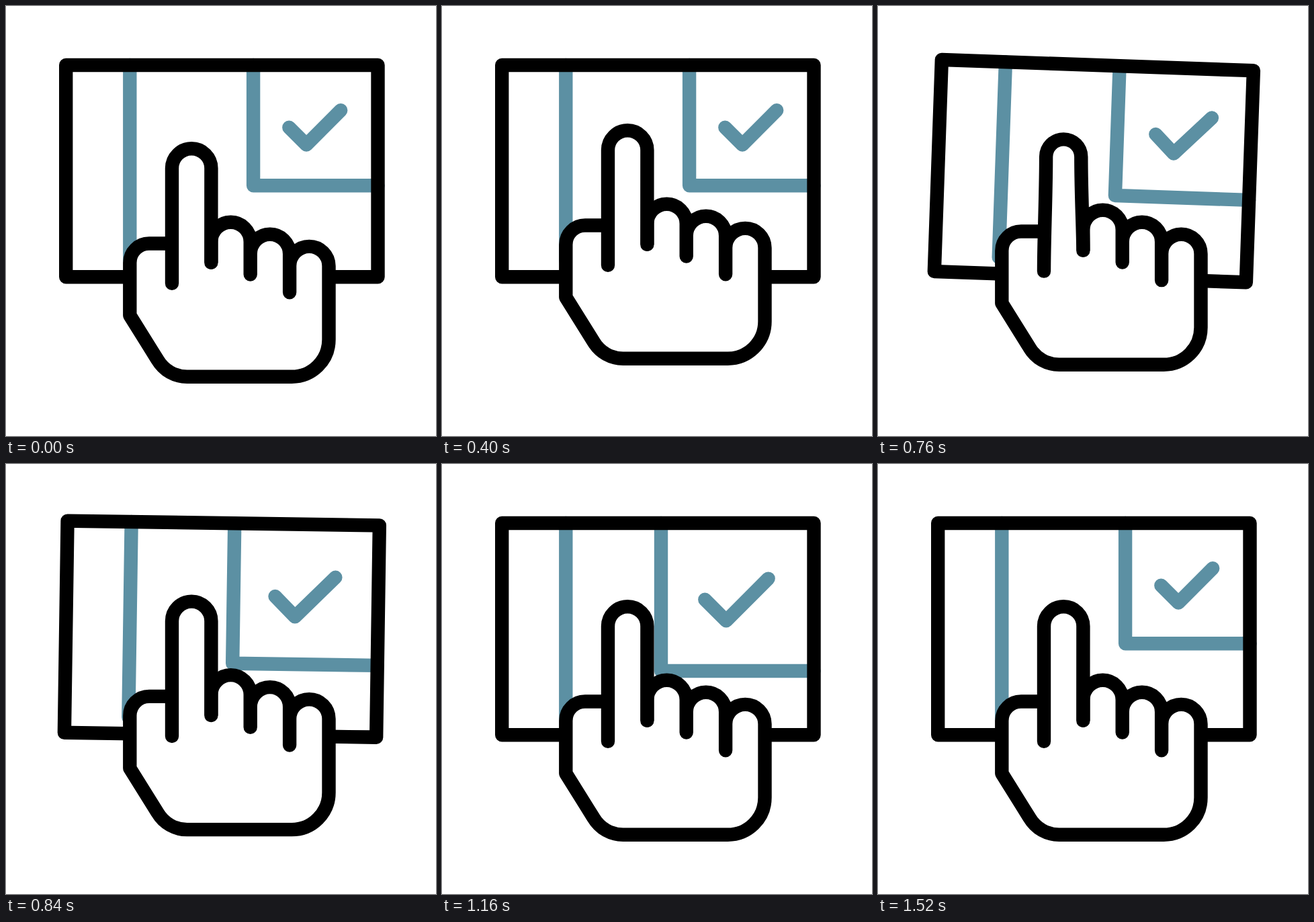
An HTML page for the animation above (1760 ms loop, 640 px wide and 640 px high).

```html
<!DOCTYPE html>
<html lang="en">
<head>
<meta charset="utf-8">
<title>Touch to confirm</title>
<style>
  html, body { margin: 0; width: 100%; height: 100%; overflow: hidden; background: #fff; }
  svg { display: block; width: 100%; height: 100%; }
  path, rect { stroke-width: 20.4; stroke-linecap: round; stroke-linejoin: round; }
  .accent { fill: none; stroke: #5c90a3; }
  .ink { stroke: #000; }
</style>
</head>
<body>
<svg viewBox="0 0 640 640">
  <g id="box">
    <path class="accent" d="M184.3 88V379"/>
    <path class="accent" id="label"/>
    <rect class="ink" fill="none" x="89.2" y="88" width="464.3" height="315.3"/>
  </g>
  <g id="hand" class="ink" fill="#fff">
    <path d="M247 353.5H213A28.7 28.7 0 0 0 184.3 382.2V460.5L225.5 526.5C235 542.5 251.5 551.8 269.5 551.8H425.3A55.2 55.2 0 0 0 480.5 496.6V387A29.2 29.2 0 0 0 422.1 387V426.2V369A29.2 29.2 0 0 0 363.7 369V399.5V351A29.2 29.2 0 0 0 305.3 351V381.7"/>
    <path id="finger"/>
  </g>
</svg>
<script>
const LOOP = 1760, STEP = 40;
const box = document.getElementById('box');
const label = document.getElementById('label');
const hand = document.getElementById('hand');
const finger = document.getElementById('finger');

// Cubic Bezier easing with y1 = 0 and y2 = 1, solved by bisection.
const ease = (x1, x2) => x => {
  if (x <= 0) return 0;
  if (x >= 1) return 1;
  let lo = 0, hi = 1, s;
  for (let i = 0; i < 24; i++) {
    s = (lo + hi) / 2;
    const r = 1 - s;
    if (3 * s * r * r * x1 + 3 * s * s * r * x2 + s ** 3 < x) lo = s;
    else hi = s;
  }
  return s * s * (3 - 2 * s);
};
const smooth = ease(1 / 3, 2 / 3);
const late = ease(2 / 3, 2 / 3);
const settle = ease(0.25, 0);
const snap = ease(0.45, 0.55);

// Each row: start, end, from, to, easing.
const tracks = {
  lift: [[40, 400, 0, -27, late], [680, 1160, -27, 0, settle]],
  press: [[400, 640, 0, 1, smooth], [680, 840, 1, 0, smooth]],
  tilt: [[560, 680, 0, 3, snap], [680, 1160, 3, 0, settle]],
  grow: [[680, 1160, 1, 1.227, settle], [1160, 1520, 1.227, 1, smooth]]
};

function value(rows, t) {
  let v = rows[0][2];
  for (const [start, end, from, to, fn] of rows) {
    if (t >= start) v = from + (to - from) * fn((t - start) / (end - start));
  }
  return v;
}

function labelPath(scale) {
  const at = (x, y) => `${553.5 - x * scale} ${88 + y * scale}`;
  return `M${at(185.4, 0)}L${at(185.4, 179.3)}L${at(0, 179.3)}` +
    `M${at(132.2, 92.7)}L${at(106.4, 118.5)}L${at(55.3, 67.3)}`;
}

function fingerPath(press) {
  const r = 29.2 - 6.2 * press, y = 241.5 + 2 * press;
  const left = 276.2 - r, right = 276.2 + r;
  return `M247 412.7C247 365 ${left} 300 ${left} ${y}` +
    `A${r} ${r} 0 0 1 ${right} ${y}C${right} 300 305.3 350 305.3 381.7`;
}

function draw(now) {
  const t = Math.floor((now % LOOP) / STEP) * STEP;
  box.setAttribute('transform', `rotate(${value(tracks.tilt, t)} 321.3 245.7)`);
  label.setAttribute('d', labelPath(value(tracks.grow, t)));
  hand.setAttribute('transform', `translate(0 ${value(tracks.lift, t)})`);
  finger.setAttribute('d', fingerPath(value(tracks.press, t)));
}

const began = performance.now();
function tick() {
  draw(performance.now() - began);
  requestAnimationFrame(tick);
}
tick();
</script>
</body>
</html>
```
